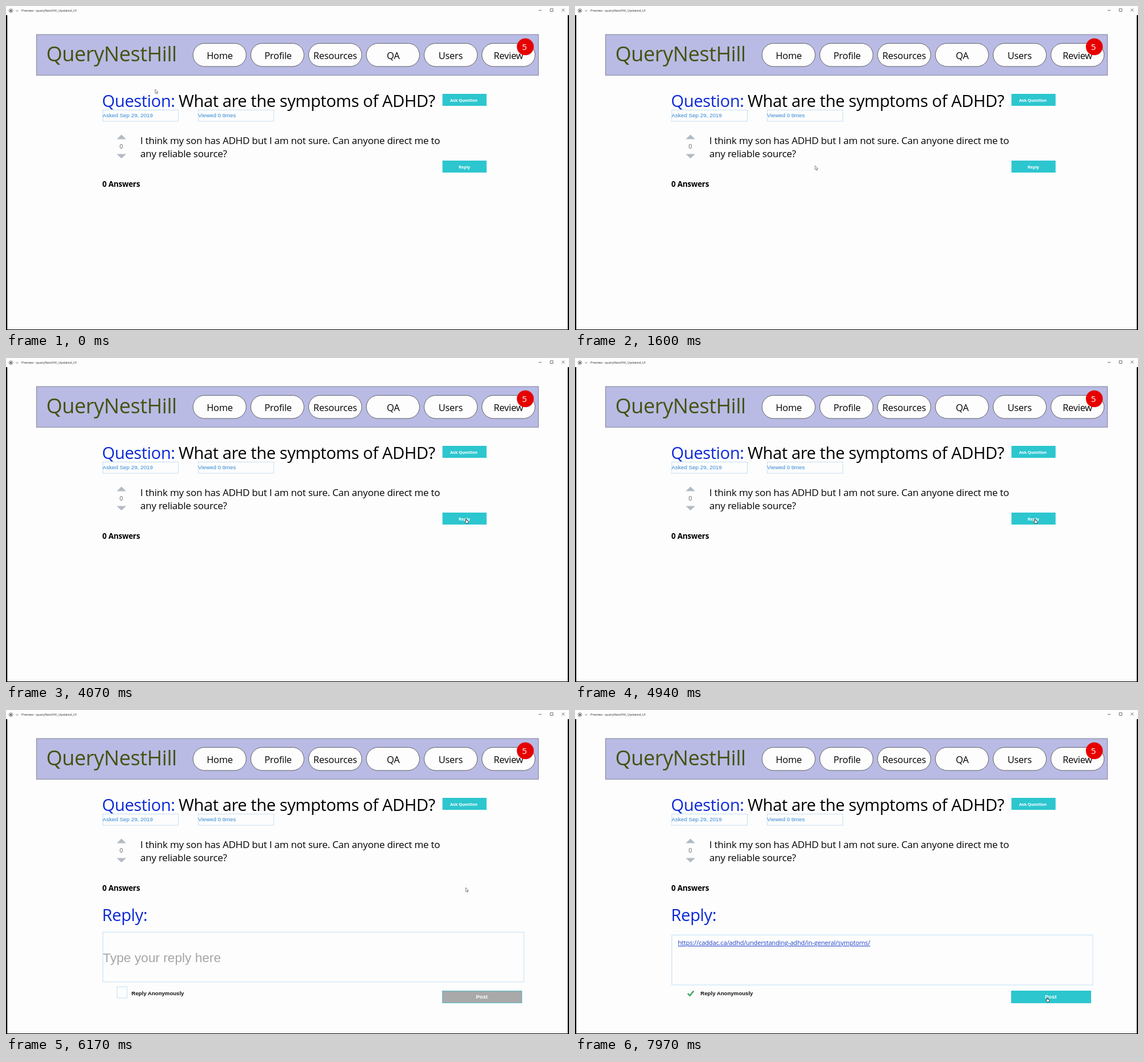
These frames come from a looping animation (985x568 px, 8 s). An HTML page:

```html
<!DOCTYPE html>
<html lang="en">
<head>
<meta charset="utf-8">
<title>Question page</title>
<style>
  html, body { margin: 0; width: 100%; height: 100%; overflow: hidden; background: #fdfdfd; }
  svg { display: block; width: 985px; height: 568px; }
  text { font-family: "Open Sans", "Noto Sans", sans-serif; letter-spacing: -.013em; white-space: pre; }
  .arial { font-family: "Liberation Sans", Arial, sans-serif; letter-spacing: 0; }
  .bold { font-weight: 700; }
  .mid { text-anchor: middle; }
  .head { font-size: 29px; }
  .line { fill: none; stroke: #333; stroke-width: .7; }
  .box { fill: none; stroke: #bcdcf5; stroke-width: .9; }
</style>
</head>
<body>
<svg viewBox="0 0 985 568" xmlns="http://www.w3.org/2000/svg">
  <rect width="985" height="568" fill="#fdfdfd"/>
  <path d="M0 16H2.2V567H982.8V16H985V568H0Z" fill="#000"/>

  <g id="titlebar">
    <circle class="line" cx="8.5" cy="8.2" r="3.2"/>
    <circle cx="8.5" cy="8.2" r="1.5" fill="#333"/>
    <path class="line" d="M17.5 7.4L19.5 9.3L21.5 7.4"/>
    <path class="line" d="M932 7.5H937M952.2 4.8H957V9.6H952.2ZM972.3 4.7L977.2 9.6M977.2 4.7L972.3 9.6"/>
    <text x="27" y="10.4" font-size="5.95" fill="#333">Preview : queryNestHill_Updated_UI</text>
  </g>

  <rect x="53.5" y="50" width="878" height="71.3" fill="#b9bbe5" stroke="#77778c" stroke-width=".9"/>
  <text x="70.5" y="97" font-size="36" fill="#46520f">QueryNestHill</text>
  <g id="nav"></g>
  <circle cx="908.6" cy="71.5" r="14.8" fill="#e60000"/>
  <text class="mid" x="907" y="77.3" font-size="15" fill="#fff">5</text>

  <text class="head" x="168" y="177.3" fill="#0a28d8">Question:</text>
  <text class="head" x="302" y="177.3" fill="#000">What are the symptoms of ADHD?</text>
  <g class="box">
    <rect x="169.5" y="182.3" width="132" height="19.8"/>
    <rect x="336.3" y="182.3" width="132" height="19.8"/>
  </g>
  <g font-size="9.78" fill="#2f86d2">
    <text class="arial" x="169" y="195.3">Asked Sep 29, 2019</text>
    <text class="arial" x="336" y="195.3">Viewed 0 times</text>
  </g>

  <path d="M193.8 233.6L202 225.4L210.2 233.6ZM193.8 259.4H210.2L202 267.2Z" fill="#b4bac1"/>
  <text class="arial mid" x="201.7" y="250" font-size="10.5" fill="#666c74">0</text>
  <g font-size="17" fill="#000">
    <text x="235" y="241.6">I think my son has ADHD but I am not sure. Can anyone direct me to</text>
    <text x="235" y="264.8">any reliable source?</text>
  </g>
  <text class="bold" x="168.5" y="317" font-size="13.3" fill="#000">0 Answers</text>

  <g>
    <rect x="763.6" y="154" width="77.2" height="21" fill="#2cc6cf"/>
    <text class="bold mid" x="801" y="167.7" font-size="7.4" fill="#fff">Ask Question</text>
  </g>
  <g id="replyButton">
    <rect x="763.6" y="271" width="77.2" height="21" fill="#2cc6cf"/>
    <text class="bold mid" x="802" y="284.7" font-size="7.4" fill="#fff">Reply</text>
  </g>

  <g id="form">
    <text class="head" x="168" y="370.3" fill="#0a28d8">Reply:</text>
    <g id="empty">
      <rect class="box" x="169.5" y="389.5" width="736.5" height="87.2"/>
      <text class="arial" x="169.6" y="441.6" font-size="22.65" fill="#a6a6a6">Type your reply here</text>
      <rect class="box" x="194.3" y="485.2" width="17.4" height="19.6"/>
    </g>
    <text class="arial bold" x="219.6" y="499.6" font-size="9.6" fill="#111">Reply Anonymously</text>
    <rect x="763.6" y="492.4" width="139" height="21.2" fill="#a9a9a9" stroke="#38bccc" stroke-width=".8"/>
    <g id="filled">
      <rect class="box" x="169.5" y="394.5" width="736.5" height="87.5"/>
      <text x="180" y="412.3" font-size="11.03" fill="#1f43cc" text-decoration="underline">https://caddac.ca/adhd/understanding-adhd/in-general/symptoms/</text>
      <path d="M197.2 497L201 500.8L207.6 492.4" fill="none" stroke="#34a455" stroke-width="2.4"/>
      <rect x="763.4" y="492" width="139.4" height="22" fill="#2cc6cf"/>
    </g>
    <text class="arial bold mid" x="832.5" y="506.4" font-size="9.4" fill="#fff">Post</text>
  </g>

  <g id="cursor" stroke-linejoin="round">
    <path id="arrow" d="M0 0V7.2L1.7 5.7L2.8 8.1L3.9 7.6L2.8 5.2H5Z" fill="#fff" stroke="#555" stroke-width=".7"/>
    <path id="hand" d="M-.8 .6Q0 -.3 .8 .6V3L3.6 3.6Q4.2 3.9 4 4.8L3.3 7.8H-.4L-2.5 4.9Q-2.1 4 -.8 5Z" fill="#fff" stroke="#222" stroke-width=".8"/>
  </g>
</svg>
<script>
const LOOP = 8000, FADE = 900, OPEN_AT = 4950, FILL_AT = 7060;
const $ = id => document.getElementById(id);

const labels = [["Home", 374], ["Profile", 476], ["Resources", 576], ["QA", 677.5], ["Users", 778], ["Review", 879]];
$("nav").innerHTML = labels.map(([label, x], i) => `
  <rect x="${327.2 + i * 101.1}" y="65.5" width="93" height="40.5" rx="20.2" fill="#fdfdfd" stroke="#444" stroke-width=".8"/>
  <text class="mid" x="${x}" y="93" font-size="16.4" fill="#000">${label}</text>`).join("");

// Pointer stops: time, x, y
const stops = [
  [0, 261, 146], [300, 261, 146], [1500, 420, 280], [1700, 420, 280],
  [2350, 477, 360], [2700, 477, 360], [3600, 805, 282], [4950, 805, 282],
  [5350, 801, 282], [6000, 801, 282], [6750, 826, 504], [LOOP, 826, 504]
];
const clamp = v => Math.min(1, Math.max(0, v));
const smooth = v => v * v * (3 - 2 * v);
const easeOut = v => 1 - (1 - v) ** 2;
const fade = (t, start) => easeOut(clamp((t - start) / FADE));

function pointer(t) {
  const i = stops.findIndex(s => s[0] > t);
  const [t0, x0, y0] = stops[i - 1], [t1, x1, y1] = stops[i];
  const k = smooth((t - t0) / (t1 - t0));
  return [x0 + (x1 - x0) * k, y0 + (y1 - y0) * k];
}

function render(t) {
  const open = fade(t, OPEN_AT), fill = fade(t, FILL_AT);
  $("replyButton").style.opacity = 1 - open;
  $("form").style.opacity = open;
  $("empty").style.opacity = 1 - fill;
  $("filled").style.opacity = fill;

  const [x, y] = pointer(t);
  const overReply = t < OPEN_AT && x > 763 && y > 271 && y < 292;
  const overPost = t > OPEN_AT && x > 763 && y > 492;
  const hover = overReply || overPost;
  $("cursor").setAttribute("transform", `translate(${x} ${y})`);
  $("hand").style.display = hover ? "" : "none";
  $("arrow").style.display = hover ? "none" : "";
}

const start = performance.now();
function tick() {
  render((performance.now() - start) % LOOP);
  requestAnimationFrame(tick);
}
tick();
</script>
</body>
</html>
```
